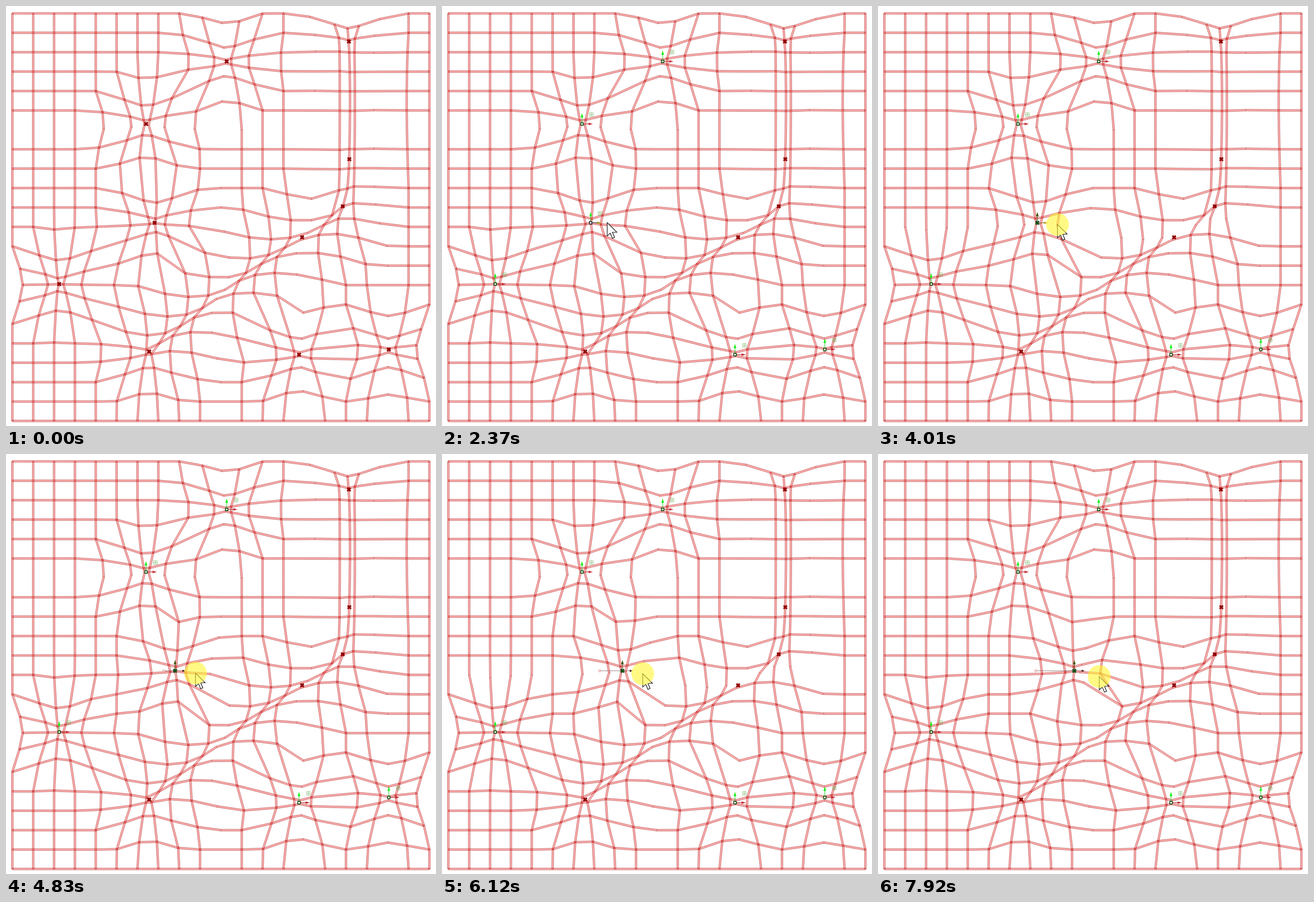
Write an HTML page with a canvas that moves like this. It is 758x739 px and loops after 7990 ms.

```html
<!DOCTYPE html>
<html lang="en">
<head>
<meta charset="utf-8">
<title>Attractor grid</title>
<style>
html, body { margin: 0; width: 100%; height: 100%; overflow: hidden; background: #fff; }
canvas { display: block; width: 758px; height: 739px; }
</style>
</head>
<body>
<canvas id="stage" width="758" height="739"></canvas>
<script>
const ctx = document.getElementById('stage').getContext('2d');
const LOOP = 7990, SELECT = 870, HOVER = 1960, PRESS = 2760;
const COLS = 20, ROWS = 21, X0 = 11.2, Y0 = 13, DX = 36.76, DY = 34.15;
const REACH = 106, HALF = 1.6;
const HOME = [262, 381.5];

const points = [[389, 97.5], [246.8, 207.5], [93.8, 489.3], [516.5, 613.5], [674.8, 604.3]];
const knots = [[604.5, 62.5], [605.2, 269.5], [593.6, 352.5], [522, 407], [252.5, 608]];
const handles = [
  [[608, 125], [607.5, 205]],
  [[604.4, 305], [603, 333]],
  [[584, 375], [555, 388]],
  [[450, 447], [332, 543]]
];

// Glides: [from ms, to ms, ...new position]
const dragPath = [[3110, 4830, 298], [5640, 6120, 318], [6120, 7450, 346]];
const cursorPath = [[1140, 1540, 288, 380], [1960, 3110, 297, 383], [3110, 4830, 334, 385.5],
  [5100, 6540, 362, 387], [6690, 7920, 390, 391.5]];

function glide(start, path, t) {
  return path.reduce((pos, [from, to, ...end]) => {
    const k = Math.min(1, Math.max(0, (t - from) / (to - from)));
    return pos.map((v, n) => v + (end[n] - v) * k);
  }, start);
}

function bezier(a, b, c, d, u) {
  const v = 1 - u;
  return [0, 1].map(n => v * v * v * a[n] + 3 * v * v * u * b[n] + 3 * v * u * u * c[n] + u * u * u * d[n]);
}

const curve = handles.flatMap(([b, c], i) =>
  Array.from({ length: 101 }, (_, n) => bezier(knots[i], b, c, knots[i + 1], n / 100)));

// Every node remembers its nearest fixed attractor.
function makeNode(i, j) {
  const x = X0 + i * DX, y = Y0 + j * DY;
  let near = null, dist = Infinity;
  for (const p of points.concat(curve)) {
    const d = Math.hypot(p[0] - x, p[1] - y);
    if (d < dist) { dist = d; near = p; }
  }
  return { x, y, near, dist };
}

const nodes = Array.from({ length: ROWS + 1 }, (_, j) =>
  Array.from({ length: COLS + 1 }, (_, i) => makeNode(i, j)));

function pull(node, drag) {
  const d = Math.hypot(drag[0] - node.x, drag[1] - node.y);
  const [target, dist] = d < node.dist ? [drag, d] : [node.near, node.dist];
  const k = Math.max(0, 1 - dist / REACH);
  return [node.x + (target[0] - node.x) * k, node.y + (target[1] - node.y) * k];
}

// A line fails where a point squeezes two of its nodes together.
function failedLines(drag) {
  const rows = new Set(), cols = new Set();
  const midway = v => Math.abs(v - Math.floor(v) - 0.5) < 0.19;
  for (const [x, y] of [...points, drag]) {
    const i = (x - X0) / DX, j = (y - Y0) / DY;
    if (midway(i)) rows.add(Math.round(j));
    if (midway(j)) cols.add(Math.round(i));
  }
  return { rows, cols };
}

function pipe(pts) {
  const dirs = pts.slice(1).map((p, i) => {
    const dx = p[0] - pts[i][0], dy = p[1] - pts[i][1], len = Math.hypot(dx, dy) || 1;
    return [dx / len, dy / len];
  });
  const left = [], right = [], bends = [];
  pts.forEach((p, i) => {
    const a = dirs[Math.max(0, i - 1)], b = dirs[Math.min(i, dirs.length - 1)];
    const nx = -(a[1] + b[1]), ny = a[0] + b[0];
    const s = HALF * 2 / Math.max(nx * nx + ny * ny, 1.5);
    left.push([p[0] + nx * s, p[1] + ny * s]);
    right.push([p[0] - nx * s, p[1] - ny * s]);
    if (Math.abs(a[0] * b[1] - a[1] * b[0]) > 0.02) bends.push(i);
  });
  ctx.beginPath();
  left.concat(right.slice().reverse()).forEach(p => ctx.lineTo(...p));
  ctx.closePath();
  ctx.fill();
  bends.forEach(i => {
    ctx.moveTo(...left[i]);
    ctx.lineTo(...right[i]);
  });
  ctx.stroke();
}

function drawGrid(drag) {
  const grid = nodes.map(row => row.map(n => pull(n, drag)));
  const failed = failedLines(drag);
  ctx.fillStyle = 'rgba(240,20,20,.34)';
  ctx.strokeStyle = 'rgba(155,15,15,.55)';
  ctx.lineWidth = 0.8;
  ctx.lineJoin = 'bevel';
  grid.forEach((row, j) => failed.rows.has(j) || pipe(row));
  grid[0].forEach((_, i) => failed.cols.has(i) || pipe(grid.map(row => row[i])));
}

function line(color, width, ...pts) {
  ctx.strokeStyle = color;
  ctx.lineWidth = width;
  ctx.beginPath();
  pts.forEach(p => ctx.lineTo(...p));
  ctx.stroke();
}

function shape(color, ...pts) {
  ctx.fillStyle = color;
  ctx.beginPath();
  pts.forEach(p => ctx.lineTo(...p));
  ctx.fill();
}

function disc(color, x, y, r) {
  ctx.fillStyle = color;
  ctx.beginPath();
  ctx.arc(x, y, r, 0, 7);
  ctx.fill();
}

function box(x, y, r, color, width) {
  ctx.strokeStyle = color;
  ctx.lineWidth = width;
  ctx.strokeRect(x - r, y - r, 2 * r, 2 * r);
}

function cross([x, y], color = '#900000') {
  const r = 2.9;
  line(color, 3, [x - r, y - r], [x + r, y + r]);
  line(color, 3, [x - r, y + r], [x + r, y - r]);
}

function arrowUp(x, y, stem, head) {
  line(stem, 1, [x, y - 3], [x, y - 13]);
  shape(head, [x, y - 19], [x - 2.4, y - 11.5], [x + 2.4, y - 11.5]);
}

function arrowRight(x, y, stem, head) {
  line(stem, 1, [x + 3, y], [x + 13, y]);
  shape(head, [x + 19, y], [x + 11.5, y - 2.2], [x + 11.5, y + 2.2]);
}

function planeIcon(x, y) {
  const r = 3.2, color = 'rgba(70,150,50,.6)';
  box(x, y, r, color, 0.8);
  line(color, 0.8, [x - r, y], [x + r, y]);
  line(color, 0.8, [x, y - r], [x, y + r]);
}

function gizmo([x, y], hover) {
  arrowUp(x, y, '#30d030', '#18f018');
  arrowRight(x, y, hover ? '#222' : '#b03030', hover ? '#a89a20' : '#c83038');
  planeIcon(x + 16.5, y - 16.5);
  shape('#fff', [x - 2, y - 2], [x + 2, y - 2], [x + 2, y + 2], [x - 2, y + 2]);
  box(x, y, 2.2, hover ? '#222' : '#0a4a0a', 1.5);
}

function dragGizmo([x, y]) {
  const start = HOME[0] + 16, far = x > start + 8;
  if (far) {
    line('rgba(110,60,60,.65)', 0.9, [start + 2, y], [x + 13, y]);
    disc('#d88', start, y, 2.2);
    disc('#fff', start, y, 1.3);
    shape('#4a1515', [x + 18, y], [x + 13, y - 2], [x + 13, y + 2]);
  } else {
    arrowRight(x, y, '#7a6a20', '#c4a840');
  }
  arrowUp(x, y, '#3a4a10', '#3f5510');
  cross([x, y], '#12501a');
}

function drawCursor([x, y], pressed) {
  const pts = [[0, 0], [0, 23.5], [5.4, 18.6], [9.2, 27.6], [13, 26], [9.2, 17.2], [17, 17]]
    .map(p => [x + p[0], y + p[1]]);
  shape('#fff', ...pts);
  ctx.lineJoin = 'miter';
  line('#111', 1.1, ...pts, pts[0], pts[1]);
  if (pressed) disc('rgba(255,245,50,.6)', x, y, 20);
}

function draw(t) {
  const drag = [glide([HOME[0]], dragPath, t)[0], HOME[1]];
  ctx.fillStyle = '#fff';
  ctx.fillRect(0, 0, 758, 739);
  drawGrid(drag);
  knots.forEach(p => cross(p));
  if (t < SELECT) {
    [...points, drag].forEach(p => cross(p));
    return;
  }
  points.forEach(p => gizmo(p));
  if (drag[0] > HOME[0]) dragGizmo(drag);
  else gizmo(drag, t >= HOVER);
  drawCursor(glide([596, 428], cursorPath, t), t >= PRESS);
}

const begin = performance.now();
function tick() {
  draw((performance.now() - begin) % LOOP);
  requestAnimationFrame(tick);
}
tick();
</script>
</body>
</html>
```
